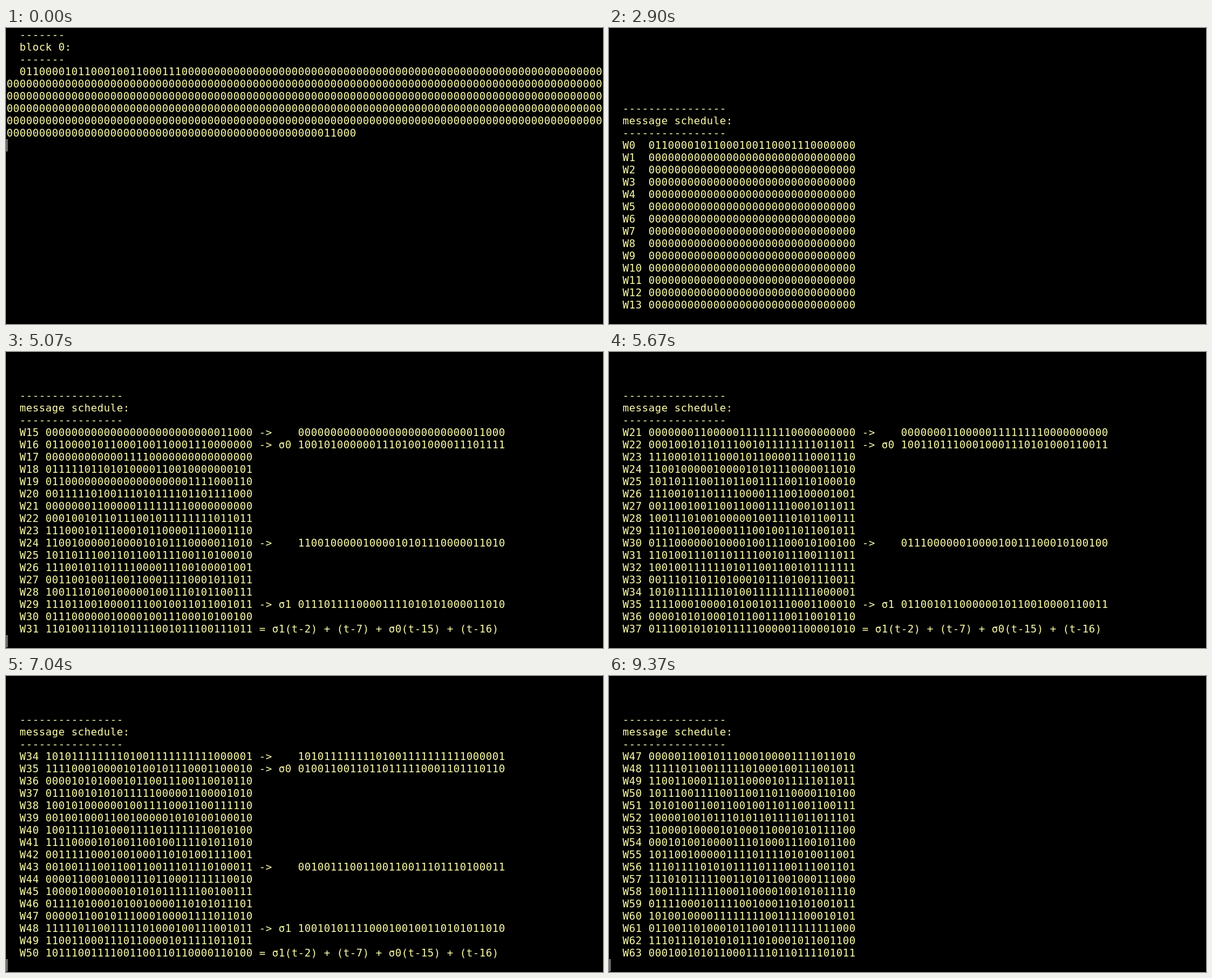
An HTML page for the animation above (9900 ms loop, 922 by 458 pixels).

```html
<!DOCTYPE html>
<html lang="en">
<head>
<meta charset="utf-8">
<title>Message schedule</title>
<style>
  html, body { margin: 0; width: 100%; height: 100%; overflow: hidden; background: #000; }
  #screen {
    position: absolute; left: 1px; top: 1px; margin: 0;
    font: 16px/19px "DejaVu Sans Mono", monospace;
    letter-spacing: calc(10px - 1ch); /* terminal cells are 10px wide */
    color: #ffffaa;
  }
  #cursor { position: absolute; left: 1px; width: 1px; height: 19px; background: #fff; }
</style>
</head>
<body>
<pre id="screen"></pre>
<div id="cursor"></div>
<script>
const LOOP = 9900, COLUMNS = 92, ROWS = 23, STEP = 100;
const HEADER_AT = 770, CLEAN_AT = 8870;

// [time, first word]: from each time on, one more word every STEP ms
const RUNS = [[1570, 0], [2200, 6], [3500, 16], [3640, 17], [5270, 33],
              [5800, 38], [6840, 48], [7670, 56], [LOOP, 64]];

const bits = (n, width = 32) => (n >>> 0).toString(2).padStart(width, '0');
const rotr = (x, n) => (x >>> n) | (x << (32 - n));
const sigma0 = x => rotr(x, 7) ^ rotr(x, 18) ^ (x >>> 3);
const sigma1 = x => rotr(x, 17) ^ rotr(x, 19) ^ (x >>> 10);

const message = [...'abc'].map(c => bits(c.charCodeAt(0), 8)).join('');
const block = (message + '1').padEnd(448, '0') + bits(message.length, 64);

const words = block.match(/.{32}/g).map(w => parseInt(w, 2));
for (let t = 16; t < 64; t++) {
  words[t] = (sigma1(words[t - 2]) + words[t - 7] + sigma0(words[t - 15]) + words[t - 16]) >>> 0;
}

function lastWord(time) {
  const run = RUNS.findLastIndex(([start]) => time >= start);
  if (run < 0) return -1;
  const [start, first] = RUNS[run];
  return Math.min(first + Math.floor((time - start) / STEP), RUNS[run + 1][1] - 1);
}

function heading(text) {
  const rule = '  ' + '-'.repeat(text.length - 1);
  return [rule, '  ' + text, rule];
}

function note(i, last) {
  const word = words[i];
  switch (last - i) {
    case 0: return ' = σ1(t-2) + (t-7) + σ0(t-15) + (t-16)';
    case 2: return ' -> σ1 ' + bits(sigma1(word));
    case 15: return ' -> σ0 ' + bits(sigma0(word));
    case 7:
    case 16: return ' ->    ' + bits(word);
    default: return '';
  }
}

function buildLines(time) {
  const last = lastWord(time);
  const remaining = '  ' + block.slice(32 * (last + 1)).padEnd(block.length);
  const lines = [...heading('block 0:'), ...remaining.match(new RegExp(`.{1,${COLUMNS}}`, 'g'))];
  if (time < HEADER_AT) return lines;

  lines.push('', ...heading('message schedule:'));
  const annotated = last >= 16 && time < CLEAN_AT;
  for (let i = Math.max(0, last - 16); i <= last; i++) {
    lines.push(`  W${i}`.padEnd(6) + bits(words[i]) + (annotated ? note(i, last) : ''));
  }
  return lines;
}

const screenEl = document.getElementById('screen');
const cursorEl = document.getElementById('cursor');
let shown = null;

function draw(now) {
  const time = now % LOOP;
  const lines = buildLines(time);
  const text = lines.slice(-ROWS).join('\n');
  if (text !== shown) screenEl.textContent = shown = text;

  const cursorOn = (time + 830) % 1200 >= 600;
  cursorEl.style.top = 1 + 19 * Math.min(lines.length, ROWS) + 'px';
  cursorEl.style.visibility = cursorOn ? 'visible' : 'hidden';
}

const begin = performance.now();
function tick() {
  draw(performance.now() - begin);
  requestAnimationFrame(tick);
}
tick();
</script>
</body>
</html>
```
